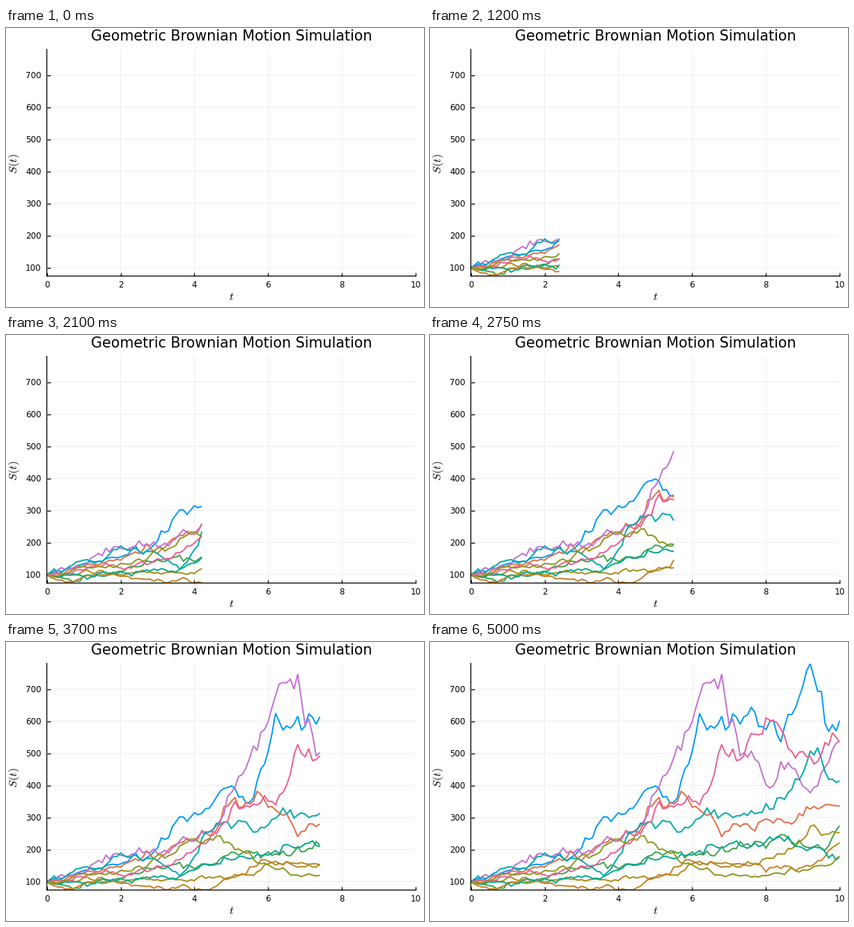
A matplotlib script that plays this animation: 600x400 px, repeating every 5050 ms.

```python
import numpy as np
import matplotlib.pyplot as plt
from matplotlib.animation import FuncAnimation

W, H, DPI = 600, 400, 100
PX = 72 / DPI            # points per pixel
LEFT, RIGHT, TOP, BOTTOM = 58.6, 588.2, 30.6, 355.6
LOW, HIGH = 74, 780.5
STEPS, DT = 100, 0.1
SIGMA, DECAY = 0.045, 0.85

plt.rcParams["font.family"] = "DejaVu Sans"
plt.rcParams["mathtext.fontset"] = "cm"
plt.rcParams["path.snap"] = False

fig = plt.figure(figsize=(W / DPI, H / DPI), dpi=DPI, facecolor="white")
ax = fig.add_axes([LEFT / W, 1 - BOTTOM / H,
                   (RIGHT - LEFT) / W, (BOTTOM - TOP) / H])
ax.set(xlim=(0, 10), ylim=(LOW, HIGH),
       xticks=range(0, 11, 2), yticks=range(100, 701, 100))
ax.set_axisbelow(True)
ax.grid(color="black", alpha=0.1, lw=0.7 * PX)
ax.tick_params(direction="in", length=5 * PX, width=1.3 * PX,
               labelbottom=False, labelleft=False)
ax.spines[["top", "right"]].set_visible(False)
ax.spines[["left", "bottom"]].set_linewidth(1.3 * PX)


def label(x, y, text, size, **kw):
    """Place text by stage pixels, measured from the top left."""
    kw = {"ha": "center", "va": "baseline", **kw}
    fig.text(x / W, 1 - y / H, text, fontsize=size, **kw)


label(323.4, 18.4, "Geometric Brownian Motion Simulation", 14.9)
label(323.4, 385, "$t$", 11.8, va="center")
label(12.4, 194.5, "$S(t)$", 11.8, va="center", rotation=90)
for t in range(0, 11, 2):
    label(LEFT + (RIGHT - LEFT) * t / 10, 371.7, str(t), 8.57)
for s in range(100, 701, 100):
    y = BOTTOM - (BOTTOM - TOP) * (s - LOW) / (HIGH - LOW)
    label(50.5, y + 4.4, str(s), 8.57, ha="right")


def walk(seed, *turns):
    """Noisy log-price path from 100 through the (step, price) turns."""
    rng = np.random.default_rng(seed)
    noise = np.zeros(STEPS + 1)
    for i in range(1, STEPS + 1):
        noise[i] = DECAY * noise[i - 1] + rng.normal(0, SIGMA)
    k, s = np.array([(0, 100), *turns]).T
    trend = np.interp(np.arange(STEPS + 1), k, np.log(s) - noise[k])
    return np.clip(np.exp(trend + noise), LOW, HIGH)


# Main turning points only; the seeded noise fills in the rest.
paths = {
    "#009afa": walk(1, (24, 190), (48, 391), (55, 348), (62, 625),
                    (84, 535), (92, 780), (97, 568), (100, 603)),
    "#e36f47": walk(2, (46, 262), (49, 335), (70, 258), (86, 285), (100, 335)),
    "#3ea44e": walk(3, (7, 78), (41, 147), (73, 225), (95, 203), (100, 275)),
    "#c371d2": walk(4, (19, 188), (43, 248), (55, 486), (62, 680),
                    (68, 747), (74, 502), (92, 377), (100, 538)),
    "#ac8e18": walk(5, (49, 112), (74, 150), (93, 277), (100, 252)),
    "#00aaae": walk(6, (28, 172), (36, 118), (43, 255), (82, 327),
                    (93, 495), (100, 414)),
    "#ed5e93": walk(7, (39, 190), (51, 350), (62, 340), (67, 495),
                    (82, 601), (94, 475), (100, 535)),
    "#c68225": walk(8, (42, 75), (55, 146), (88, 134), (100, 222)),
    "#00a98d": walk(9, (23, 96), (50, 168), (83, 240), (100, 178)),
    "#8e971e": walk(10, (40, 233), (47, 243), (74, 120), (88, 134), (100, 180)),
}
lines = [ax.plot([], [], color=c, lw=2 * PX, solid_capstyle="butt",
                 solid_joinstyle="miter")[0] for c in paths]
time = np.arange(STEPS + 1) * DT


def draw(frame):
    n = frame + 1
    for line, path in zip(lines, paths.values()):
        line.set_data(time[:n], path[:n])
    return lines


anim = FuncAnimation(fig, draw, frames=STEPS + 1, init_func=lambda: draw(0),
                     interval=50, repeat=True, repeat_delay=0, blit=False)
plt.show()
```
